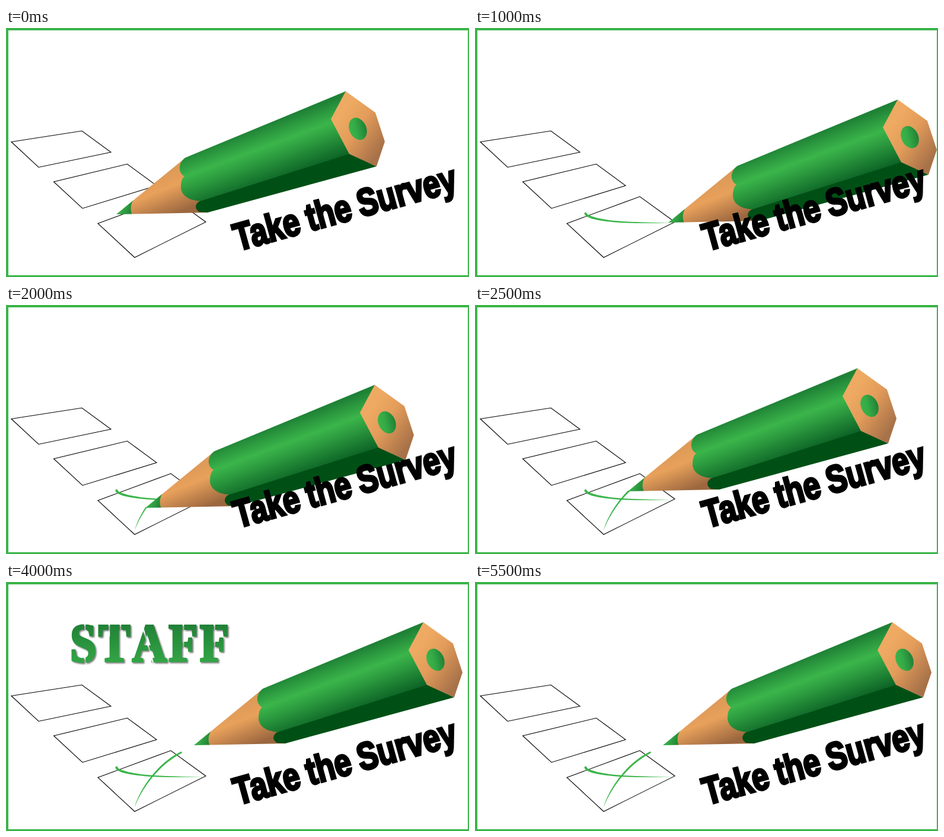
Recreate the animation shown at these times as an HTML page. Size 781 by 421 pixels, loop 6 s.

```html
<!DOCTYPE html>
<html lang="en">
<head>
<meta charset="utf-8">
<title>Take the Survey</title>
<style>
  html, body { margin: 0; width: 100%; height: 100%; overflow: hidden; background: #fff; }
  svg { display: block; width: 781px; height: 421px; }
  .box { fill: none; stroke: #000; stroke-width: 1.1; }
  .mark { fill: #3bb54a; }
  .slogan {
    font: bold 65px "Liberation Sans", Arial, sans-serif;
    word-spacing: -.03em; stroke: #000; stroke-width: 4;
  }
  .staff {
    font: bold 90px "Liberation Serif", "Times New Roman", serif;
    font-kerning: none; letter-spacing: 4px;
    fill: url(#ink); stroke: url(#ink); stroke-width: 4;
  }
  #staff { filter: drop-shadow(2px 2px 1.2px rgba(0, 0, 0, .5)); }
</style>
</head>
<body>
<svg viewBox="0 0 781 421">
  <defs>
    <linearGradient id="body" gradientUnits="userSpaceOnUse" x1="438" y1="163" x2="471" y2="252">
      <stop offset="0" stop-color="#1f8236"/>
      <stop offset=".37" stop-color="#3bb54a"/>
      <stop offset=".52" stop-color="#31a343"/>
      <stop offset="1" stop-color="#0d6426"/>
    </linearGradient>
    <linearGradient id="wood" gradientUnits="userSpaceOnUse" x1="252" y1="252" x2="278" y2="318">
      <stop offset="0" stop-color="#de9a58"/>
      <stop offset=".35" stop-color="#e8a15b"/>
      <stop offset="1" stop-color="#9c673f"/>
    </linearGradient>
    <linearGradient id="face" gradientUnits="userSpaceOnUse" x1="560" y1="155" x2="632" y2="205">
      <stop offset="0" stop-color="#eeaa62"/>
      <stop offset=".4" stop-color="#e39c5a"/>
      <stop offset="1" stop-color="#a87249"/>
    </linearGradient>
    <linearGradient id="lead" x1="0" y1=".3" x2="1" y2=".6">
      <stop offset="0" stop-color="#3bb54a"/>
      <stop offset=".4" stop-color="#35aa46"/>
      <stop offset="1" stop-color="#1f8036"/>
    </linearGradient>
    <linearGradient id="ink" x1="0" y1="0" x2="0" y2="1">
      <stop offset=".15" stop-color="#1f7f35"/>
      <stop offset=".85" stop-color="#33a646"/>
    </linearGradient>
    <mask id="stencil" maskUnits="userSpaceOnUse" x="100" y="60" width="290" height="85">
      <rect x="100" y="60" width="290" height="85" fill="#fff"/>
      <path d="M133 66V86M133 121V142M174 66V92M193 66V92M230 74L249 140M299 66V126M351.500 66V126"
            stroke="#000" stroke-width="2.5"/>
    </mask>
    <clipPath id="acrossClip"><rect id="across" x="180" y="300" height="40"/></clipPath>
    <clipPath id="upClip"><rect id="up" x="210" width="100" height="110"/></clipPath>
  </defs>

  <rect width="781" height="421" fill="#3bb54a"/>
  <rect x="4" y="4" width="775" height="414" fill="#fff"/>

  <path class="box" d="M9 192.500L128 174L177 210L55 235.500Z"/>
  <path class="box" d="M80.500 260L204.500 230L254 266.500L129 305Z"/>
  <path class="box" d="M155 330.500L278 285L337 328L217 388Z"/>

  <path class="mark" clip-path="url(#acrossClip)"
        d="M184.500 313Q186 310 188.500 313C189 318 215 325 250 327C280 328.500 310 329.500 335 329.500C300 330.500 265 330.200 240 328.700C205 326 184 321 184.500 313Z"/>
  <path class="mark" clip-path="url(#upClip)"
        d="M217 381C223 357 250 309 295.500 286.500L297 289C254 311 227 354 217 381Z"/>

  <g id="pencil">
    <path fill="url(#wood)" d="M214 292L303 219L335 260L340 312L212 314.500Q206 303 214 292Z"/>
    <path fill="url(#lead)" d="M186 315L214.500 291.500C210 299 209.500 307 212.500 314.500Z"/>
    <path fill="#005016" d="M328 292L579 212L625 234L340 312L326 311C317 306 319 296 328 292Z"/>
    <path fill="url(#body)"
          d="M303 219L573 107L579 213L328 292.500C309 292 295 283 295 269C295 260 297 254 301 251C288 243 292 226 303 219Z"/>
    <path fill="url(#face)" d="M573 107L623 143L639 192L625 234L579 213L548 154Z"/>
    <ellipse cx="593.500" cy="170.500" rx="14.300" ry="19.500" transform="rotate(-25 593.500 170.500)" fill="url(#lead)"/>
  </g>

  <text class="slogan" transform="translate(391 377) rotate(-15.400) scale(.79 1)">Take the Survey</text>

  <g id="staff"><g mask="url(#stencil)">
    <text class="staff" transform="translate(108 133.500) scale(.89 1)">STAFF</text>
  </g></g>
</svg>
<script>
  const STEP = 500;
  const HOME = [186, 315];
  const DONE = { tip: [317, 276], across: 336, up: 280 };
  // tip: pencil point; across: first stroke drawn up to x; up: second stroke drawn up to y
  const poses = [
    { tip: HOME, across: 180, up: 390 },
    { tip: [225, 325], across: 225, up: 390 },
    { tip: [326, 329], across: 328, up: 390 },
    { tip: [217, 380], across: 336, up: 390 },
    { tip: [235, 343], across: 336, up: 342 },
    { tip: [258, 315], across: 336, up: 314 }
  ];
  const BLINKS = 6;
  const count = poses.length + BLINKS;
  const el = id => document.getElementById(id);
  const [pencil, across, up, staff] = ["pencil", "across", "up", "staff"].map(el);
  const start = performance.now();
  let last = -1;

  function show(i) {
    const pose = poses[i] || DONE;
    const [x, y] = pose.tip;
    pencil.setAttribute("transform", `translate(${x - HOME[0]} ${y - HOME[1]})`);
    across.setAttribute("width", pose.across - 180);
    up.setAttribute("y", pose.up);
    const lit = i >= poses.length && (i - poses.length) % 2 === 0;
    staff.style.visibility = lit ? "visible" : "hidden";
  }

  function tick(now) {
    const i = Math.floor(Math.max(0, now - start) / STEP) % count;
    if (i !== last) show(last = i);
    requestAnimationFrame(tick);
  }
  tick(start);
</script>
</body>
</html>
```
